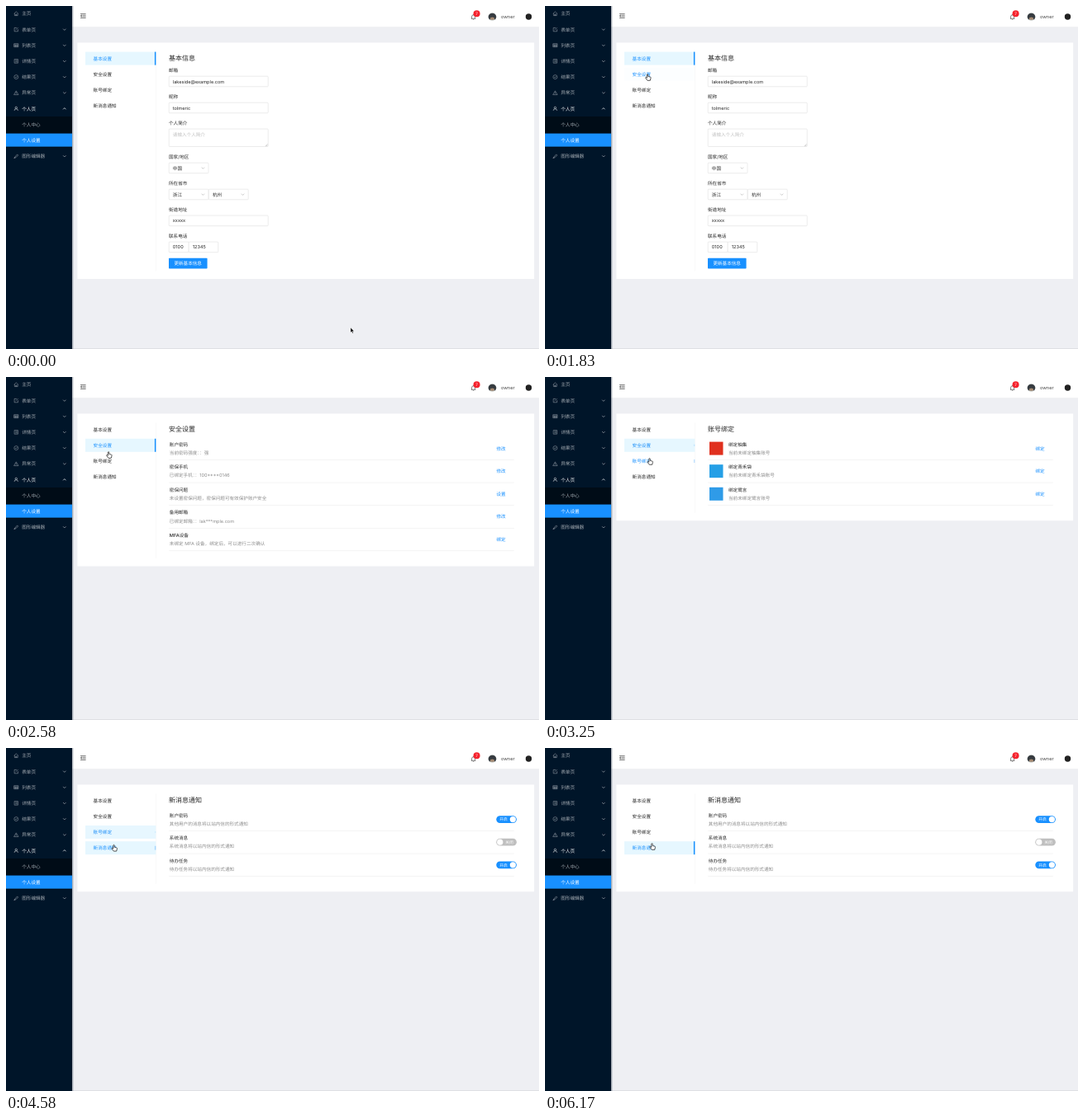
Recreate the animation shown at these times as an HTML page. Size 645 by 416 pixels, loop 6210 ms.

```html
<!DOCTYPE html>
<html lang="zh">
<head>
<meta charset="utf-8">
<style>
html, body { margin: 0; width: 100%; height: 100%; overflow: hidden; background: #eeeff3; }
svg { display: block; width: 645px; height: 416px; }
text { font: 5.6px Inter, "Noto Sans CJK SC", "Noto Sans CJK", sans-serif; text-rendering: geometricPrecision; white-space: pre; }
</style>
</head>
<body>
<svg id="stage" viewBox="0 0 645 416"></svg>
<script>
const LOOP = 6210, STEP = 200 / 3;
const BLUE = '#1890ff', INK = '#262626', GREY = '#8c8c8c', LINE = '#d9d9d9';
const ROW = 19.2, ITEM = 27.6;

// y is always the vertical centre
const text = (x, y, s, fill = INK, size = 5.6, weight = 400) =>
  `<text x="${x}" y="${y + size * .37}" fill="${fill}" style="font-size:${size}px;font-weight:${weight}">${s}</text>`;
const rect = (x, y, w, h, fill, more = '') =>
  `<rect x="${x}" y="${y}" width="${w}" height="${h}" fill="${fill}" ${more}/>`;
const circle = (x, y, r, fill) => `<circle cx="${x}" cy="${y}" r="${r}" fill="${fill}"/>`;
const stroke = (x, y, d, color, width = .5) =>
  `<path transform="translate(${x} ${y})" d="${d}" fill="none" stroke="${color}" stroke-width="${width}"/>`;
const box = (x, y, w, h = 12.6) => rect(x, y - h / 2, w, h, '#fff', `rx=".8" stroke="${LINE}" stroke-width=".5"`);
const DOWN = 'M-1.7-.8L0 .9 1.7-.8', UP = 'M-1.7.8L0-.9 1.7.8';

function sidebar() {
  const rows = [
    ['主页', 'M-2.6 0L0-2.4 2.6 0M-1.9-.4V2.3H1.9V-.4M-.5 2.3V.7H.5V2.3'],
    ['表单页', 'M.8-2.1H-2.2V2.3H2.2V-.3M-.7.7L2.3-2.3'],
    ['列表页', 'M-2.6-2H2.6V2H-2.6ZM-2.6-.7H2.6M-2.6.7H2.6M-.9-.7V2M.9-.7V2'],
    ['详情页', 'M-2.2-2.3H2.2V2.3H-2.2ZM-.3-1H1.3M-.3 0H1.3M-.3 1H1.3M-1.3-1h.5M-1.3 0h.5M-1.3 1h.5'],
    ['结果页', 'M-2.5 0a2.5 2.5 0 1 0 5 0a2.5 2.5 0 1 0-5 0M-1.1 0L-.2.9 1.2-.9'],
    ['异常页', 'M0-2.4L2.7 2.3H-2.7ZM0-.8V.7M0 1.3v.4'],
    ['个人页', 'M-1.2-1.1a1.2 1.2 0 1 0 2.4 0a1.2 1.2 0 1 0-2.4 0M-2.2 2.4a2.2 2.2 0 0 1 4.4 0'],
    ['个人中心'], ['个人设置'],
    ['图形编辑器', 'M-2.5 2.3L-.9.3 1.3-2.2 2.4-1.1 .3 1.1-1.2 1.3ZM-2.5 2.3H-.8']
  ];
  return rect(0, 0, 80, 416, '#001529') + rect(80, 0, 2.4, 416, 'url(#shade)') +
    rect(0, 134, 80, 37.5, '#000c17') + rect(0, 154.6, 80, 16, BLUE) +
    rows.map(([name, icon], i) => {
      const y = 9.3 + ROW * i, color = i == 6 || i == 8 ? '#fff' : '#a6adb4';
      return text(19.2, y, name, color) + (icon ? stroke(12.3, y, icon, color) : '') +
        (icon && i ? stroke(70.8, y, i == 6 ? UP : DOWN, color, .7) : '');
    }).join('');
}

function header() {
  return rect(80, 0, 565, 25.6, '#fff') + rect(80, 25.6, 565, .5, '#e6e8ec') +
    stroke(93.3, 12, 'M-3.3-2.5H3.3M-.8-.8H3.3M-.8.8H3.3M-3.3 2.5H3.3M-1.7-1.2L-3.2 0-1.7 1.2Z', '#333', .6) +
    stroke(565.6, 13.3, 'M-2.7 2H2.7M-2 2V-.4a2 2 0 0 1 4 0V2M0-2.4V-3.1M-.7 2.9H.7', '#333', .6) +
    circle(569.6, 9.2, 4, '#f5222d') + text(568.2, 9.2, '7', '#fff', 4.6) +
    circle(588.5, 13, 4.9, '#d5d8d6') +
    '<path d="M583.7 13.5a4.8 4.8 0 0 1 9.6 0l-1.1 2.8h-7.4z" fill="#363b40"/>' +
    '<ellipse cx="588.5" cy="15.2" rx="2.7" ry="1.6" fill="#a58a72"/>' +
    text(599, 12.8, 'owner', '#444') + circle(632.5, 13, 3.7, '#222');
}

const title = s => text(197, 62.8, s, INK, 8, 500);

function basicPage() {
  const labels = [['邮箱', 77.5], ['昵称', 109.5], ['个人简介', 141.5], ['国家/地区', 182.5],
    ['所在省市', 214.5], ['街道地址', 246.5], ['联系电话', 278.5]];
  const input = (x, y, w, s) => box(x, y, w) + text(x + 4.6, y, s);
  const select = (x, y, s) => input(x, y, 47.8, s) + stroke(x + 41.2, y, DOWN, '#aaa', .6);
  return title('基本信息') + labels.map(([s, y]) => text(197, y, s)).join('') +
    input(197.2, 91.5, 120, 'lakeside@example.com') + input(197.2, 123.5, 120, 'tolmeric') +
    box(197.2, 159.8, 120, 21.4) + text(201.8, 155.5, '请输入个人简介', '#bfbfbf') +
    stroke(315.3, 168.8, 'M-1.3 1.3L1.3-1.3M0 1.3L1.3 0', '#888', .4) +
    select(197.2, 196.5, '中国') + select(197.2, 228.5, '浙江') + select(245.4, 228.5, '杭州') +
    input(197.2, 260.4, 120, 'xxxxx') + input(197.2, 292.4, 24, '0100') + input(221.2, 292.4, 35.6, '12345') +
    rect(197, 305.8, 46.6, 12.8, BLUE, 'rx=".8"') + text(203.4, 312.2, '更新基本信息', '#fff');
}

// Each row: title, description, right-hand part
const listPage = (name, x, rows, right) => title(name) + rows.map(([head, desc, extra], i) => {
  const y = 86.6 + ITEM * i;
  return text(x, y - 5, head, INK, 5.6, 500) + text(x, y + 5.2, desc, GREY) +
    rect(197.2, y + 13.6, 417.6, .5, '#e8e8e8') + right(extra, y);
}).join('');

const link = (s, y) => text(593.4, y, s, BLUE);
const logoLink = (color, y) => rect(199, y - 8, 16.5, 16, color) + link('绑定', y);
const toggle = (on, y) => rect(593.3, y - 4.4, 24.6, 8.8, on ? BLUE : '#bfbfbf', 'rx="4.4"') +
  circle(on ? 613.4 : 597.8, y, 3.6, '#fff') + text(on ? 597.2 : 604.3, y, on ? '开启' : '关闭', '#fff', 4.8);

const pages = [
  [331, basicPage()],
  [229.5, listPage('安全设置', 197.8, [
    ['账户密码', '当前密码强度：：强', '修改'],
    ['密保手机', '已绑定手机：：100****0146', '修改'],
    ['密保问题', '未设置密保问题，密保问题可有效保护账户安全', '设置'],
    ['备用邮箱', '已绑定邮箱：：lak***mple.com', '修改'],
    ['MFA设备', '未绑定 MFA 设备，绑定后，可以进行二次确认', '绑定']], link)],
  [174.2, listPage('账号绑定', 222, [
    ['绑定柚集', '当前未绑定柚集账号', '#e0301e'],
    ['绑定青禾袋', '当前未绑定青禾袋账号', '#259fe6'],
    ['绑定鹭言', '当前未绑定鹭言账号', '#2f9be8']], logoLink)],
  [174.2, listPage('新消息通知', 197.8, [
    ['账户密码', '其他用户的消息将以站内信的形式通知', true],
    ['系统消息', '系统消息将以站内信的形式通知', false],
    ['待办任务', '待办任务将以站内信的形式通知', true]], toggle)]
];

// Times in ms: [on, off] spans for the blue label, the tint and the side bar
const END = 9999, START = -999;
const tabs = [
  { name: '基本设置', label: [[START, 1900]], tint: [START, 1900], bar: [START, 1900] },
  { name: '安全设置', label: [[1330, 3180]], tint: [1740, 3180], bar: [1900, 3180] },
  { name: '账号绑定', label: [[1180, 1300], [2850, 4510]], tint: [3180, 4510], bar: [3180, 4510] },
  { name: '新消息通知', label: [[1040, 1180], [4150, END]], tint: [4270, END], bar: [4510, END] }
];
const tabY = i => 63.6 + ROW * i;

// Pointer stops: time, x, y
const path = [[0, 417, 390], [200, 417, 390], [1040, 143.6, 118], [1560, 123.6, 82.5], [2100, 123.6, 82.5],
  [2580, 123.6, 90.5], [3100, 126, 98.5], [3500, 126, 98.5], [4250, 130, 117.3], [4700, 130, 117.3],
  [5500, 129, 115.6], [LOOP, 129, 115.6]];

stage.innerHTML = '<defs><linearGradient id="shade"><stop stop-color="#001529" stop-opacity=".35"/>' +
  '<stop offset="1" stop-color="#001529" stop-opacity="0"/></linearGradient></defs>' +
  rect(0, 0, 645, 416, '#eeeff3') + rect(80, 415, 565, 1, '#dfe0e4') + header() + sidebar() +
  rect(86.4, 44.4, 552.8, 0, '#fff', 'id="card"') + rect(181, 55.6, .4, 0, '#f0f0f0', 'id="divider"') +
  tabs.map((tab, i) => `<g class="tab">${rect(96, tabY(i) - 8, 85.4, 16, '#e6f7ff')}` +
    rect(179.9, tabY(i) - 8, 1.5, 16, BLUE) + text(105.6, tabY(i), tab.name) + '</g>').join('') +
  pages.map(p => `<g class="page">${p[1]}</g>`).join('') +
  `<g id="pointer" stroke-linejoin="round">
    <path d="M0 0V6L1.4 4.8 2.3 6.9 3.3 6.5 2.4 4.4H4.2Z" fill="#000" stroke="#fff" stroke-width=".4"/>
    <path d="M-.2 .6Q.5-.4 1.2 .6V2.9L3.9 3.6Q4.6 3.9 4.4 5L3.7 7.8H.3L-1.9 4.9Q-2.2 3.9-1.1 4.1L-.2 4.8Z"
      fill="#fff" stroke="#111" stroke-width=".7"/></g>`;

const tabNodes = document.querySelectorAll('.tab'), pageNodes = document.querySelectorAll('.page');
const [arrow, hand] = pointer.children;

const clamp = v => Math.min(1, Math.max(0, v));
const ease = v => (v = clamp(v)) < .5 ? 4 * v ** 3 : 1 - 4 * (1 - v) ** 3;
const span = (t, [on, off], rise, fall) => ease((t - on) / rise) * (1 - ease((t - off) / fall));
const mix = (a, b, k) => Math.round(a + (b - a) * k);

function draw(now) {
  const t = Math.max(0, 40 + STEP * Math.floor((now % LOOP - 40) / STEP + .2));

  const current = [1900, 3180, 4510].filter(c => t >= c).length;
  pageNodes.forEach((node, i) => node.style.display = i == current ? '' : 'none');
  card.setAttribute('height', pages[current][0] - 44.4);
  divider.setAttribute('height', pages[current][0] - 65);

  tabs.forEach((tab, i) => {
    const [tint, bar, label] = tabNodes[i].children;
    const blue = Math.max(...tab.label.map(s => span(t, s, 200, 300)));
    const size = span(t, tab.bar, 150, 90);
    tint.setAttribute('opacity', span(t, tab.tint, 300, 300));
    bar.setAttribute('opacity', size);
    bar.setAttribute('height', 16 * size);
    bar.setAttribute('y', tabY(i) - 8 * size);
    label.setAttribute('fill', `rgb(${mix(38, 24, blue)},${mix(38, 144, blue)},${mix(38, 255, blue)})`);
  });

  const n = Math.max(1, path.findIndex(p => p[0] >= t));
  const [t0, x0, y0] = path[n - 1], [t1, x1, y1] = path[n];
  const k = clamp((t - t0) / (t1 - t0)), s = k * k * (3 - 2 * k);
  const x = x0 + (x1 - x0) * s, y = y0 + (y1 - y0) * s;
  pointer.setAttribute('transform', `translate(${x} ${y})`);
  const overMenu = x < 181 && y < 130;
  arrow.style.display = overMenu ? 'none' : '';
  hand.style.display = overMenu ? '' : 'none';
}

const begin = performance.now();
(function frame() {
  draw(performance.now() - begin);
  requestAnimationFrame(frame);
})();
</script>
</body>
</html>
```
